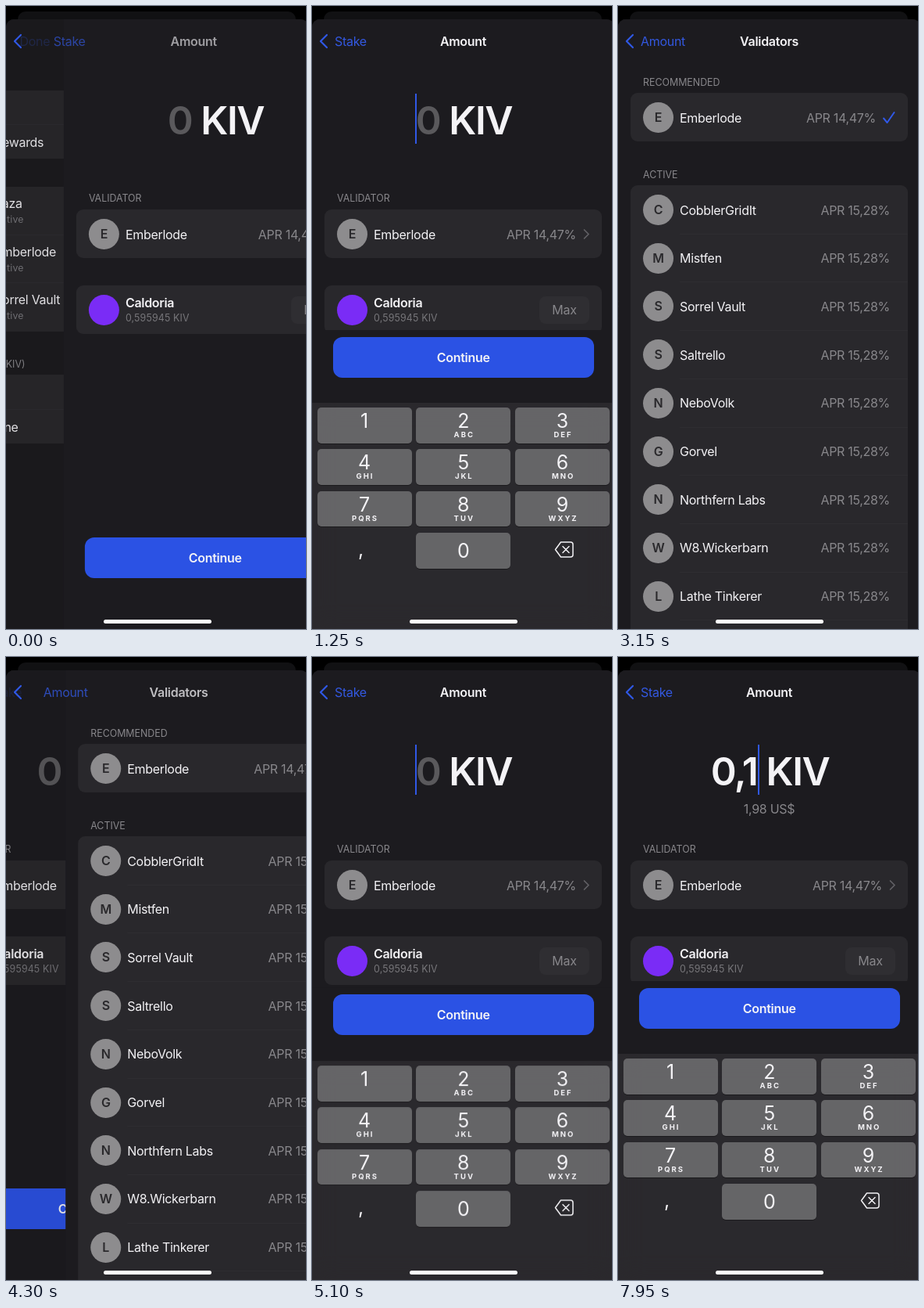
Recreate the animation shown at these times as an HTML page. Size 384x796 px, loop 8 s.

```html
<!DOCTYPE html>
<html lang="en">
<head>
<meta charset="utf-8">
<title>Stake amount</title>
<style>
html, body { margin: 0; width: 100%; height: 100%; overflow: hidden; background: #000; }
body { font: 16px/20px Inter, Roboto, sans-serif; letter-spacing: -.3px; color: #f4f3f6; }
#stage { position: relative; width: 384px; height: 796px; overflow: hidden; }
#stage div, svg { position: absolute; }
svg { fill: none; overflow: visible; stroke-linecap: round; stroke-linejoin: round; }
.behind { left: 15px; top: 7px; width: 356px; height: 30px; border-radius: 10px; background: #111113; }
.sheet { left: 0; top: 17px; width: 387px; height: 779px; border-radius: 10px 10px 0 0; overflow: hidden; background: #1c1b1f; }
.page, #nav { left: 0; top: -17px; width: 387px; height: 796px; }
.page { background: #1c1b1f; }
.t { white-space: pre; }
.b { font-weight: 600; }
.g { color: #88878b; }
.small { font-size: 12.4px; letter-spacing: 0; }
.sub { font-size: 12.4px; letter-spacing: .15px; color: #77767a; }
.blue { color: #3358e0; }
.card { left: 16px; width: 355px; border-radius: 9px; background: #29282c; }
.line { left: 79px; width: 292px; height: 1px; background: #2e2d31; }
.dot { left: 32px; width: 39px; height: 39px; border-radius: 50%; background: #8d8c8e; color: #2a292c;
  text-align: center; line-height: 39px; font-weight: 600; }
.mid { left: 0; width: 387px; text-align: center; white-space: pre; }
.big { font-size: 50px; font-weight: 600; letter-spacing: -1.5px; line-height: 60px; top: 115.5px; left: 1px; }
.caret { display: inline-block; width: 0; position: relative; }
.caret::before { content: ""; position: absolute; left: -1px; top: -52px; width: 2px; height: 64px; background: #3058e6; }
#after::before { left: 1px; }
.max { left: 291px; top: 371px; width: 64px; height: 35px; border-radius: 8px; background: #2f2e32; text-align: center; line-height: 35px; }
#bar { left: 0; top: 670px; width: 387px; height: 400px; background: #1c1b1f; }
.go { left: 26.5px; top: 8.5px; width: 334.5px; height: 52px; border-radius: 12px; background: #2b52e4; text-align: center; line-height: 52px; }
#keys { left: 0; top: 507px; width: 387px; height: 289px; background: rgba(48,47,50,.74); backdrop-filter: blur(16px); }
.key { width: 121px; height: 45.5px; border-radius: 5px; background: rgba(255,255,255,.28); box-shadow: 0 1px rgba(0,0,0,.35);
  text-align: center; font-size: 25px; letter-spacing: 0; }
.key div { left: 0; width: 100%; }
.key .abc { top: 25px; font-size: 9.5px; font-weight: 700; letter-spacing: 2px; text-indent: 2px; }
.home { left: 125px; top: 783.5px; width: 138px; height: 5px; border-radius: 3px; background: #fff; }
</style>
</head>
<body>
<div id="stage"></div>
<script>
const COIN = "KIV", MAIN = "Emberlode", SORREL = "Sorrel Vault";
const LIST = ["CobblerGridIt", "Mistfen", SORREL, "Saltrello", "NeboVolk", "Gorvel",
  "Northfern Labs", "W8.Wickerbarn", "Lathe Tinkerer", "Quillmere"];

// y is the middle of the capitals
const text = (x, y, s, cls = "") => `<div class="t ${cls}" style="left:${x}px;top:${y - 10}px">${s}</div>`;
const right = (x, y, s) => `<div class="t g" style="right:${387 - x}px;top:${y - 10}px">${s}</div>`;
const card = (top, bottom) => `<div class="card" style="top:${top}px;height:${bottom - top}px"></div>`;
const line = y => `<div class="line" style="top:${y}px"></div>`;
const dot = (y, s, style = "") => `<div class="dot" style="top:${y - 19.5}px;${style}">${s}</div>`;
const path = (d, color, w) => `<svg width="1" height="1" style="left:0;top:0"><path d="${d}" stroke="${color}" stroke-width="${w}"/></svg>`;
const row = (y, name, apr, edge) => dot(y, name[0]) + text(79, y, name) + right(edge, y, "APR " + apr);

const stakePage = card(108, 195) + line(151) + text(79, 174, "Rewards") +
  card(231, 416) + ["Iraza", MAIN, SORREL].map((n, i) =>
    text(79, 252 + i * 61.7, n) + text(79, 273 + i * 61.7, "Active", "sub") + (i ? line(230 + i * 61.7) : "")).join("") +
  text(32, 457.5, `STAKING (${COIN})`, "g small") + card(471, 559) + line(515) + text(79, 538, "Line");

const amountPage = `<div class="mid big"><i class="caret" id="before"></i><span id="num">0</span><i class="caret" id="after"></i> ${COIN}</div>
  <div class="mid g" id="usd" style="top:184px"></div>` +
  text(32, 246, "VALIDATOR", "g small") + card(260, 322) + row(291.5, MAIN, "14,47%", 338) +
  path("M348.5 286l5.5 5.5-5.5 5.5", "#626165", 1.7) +
  card(357, 419) + dot(388, "", "background:#7a2cf6") + text(79, 378.5, "Caldoria", "b") +
  text(79, 399, "0,595945 " + COIN, "sub") + `<div class="max g">Max</div>
  <div id="bar"><div class="go b">Continue</div></div>`;

const listPage = text(32, 97.5, "RECOMMENDED", "g small") + card(111, 173) + row(142.5, MAIN, "14,47%", 330) +
  path("M340 143.5l4.5 5.5 9-13", "#3058e6", 2) +
  text(32, 215.5, "ACTIVE", "g small") + card(229, 860) +
  LIST.map((n, i) => row(260.5 + i * 61.7, n, "15,28%", 348) + (i ? line(229 + i * 61.7) : "")).join("");

const titles = ["Stake", "Amount", "Validators"], backs = ["Done", "Stake", "Amount"];
const nav = titles.map((s, i) => `<div class="mid b title" style="top:35px">${s}</div>` +
  `<div class="t blue back" style="left:${i ? 29 : 62}px;top:35px">${backs[i]}</div>`).join("") +
  path("M19 37l-8 8 8 8", "#3058e6", 2.2);

const key = (n, col, r, abc) => `<div class="key" id="k${n}" style="left:${6.5 + col * 126.8}px;top:${6 + r * 53.4}px">` +
  `<div style="top:${n ? 7 : 13}px">${n}</div><div class="abc">${abc}</div></div>`;
const keys = ["", "ABC", "DEF", "GHI", "JKL", "MNO", "PQRS", "TUV", "WXYZ"]
  .map((abc, i) => key(i + 1, i % 3, Math.floor(i / 3), abc)).join("") + key(0, 1, 3, "") +
  `<div style="left:59px;top:177px;font-size:25px">,</div>` +
  path("M318.5 178h12.5a3 3 0 0 1 3 3v13a3 3 0 0 1-3 3h-12.5l-7-9.5zM321 183.5l8 8m0-8l-8 8", "#f4f3f6", 1.5);

const $ = id => document.getElementById(id);
$("stage").innerHTML = `<div class="behind"></div><div class="sheet">` +
  [stakePage, amountPage, listPage].map(p => `<div class="page">${p}</div>`).join("") +
  `<div id="nav">${nav}</div></div><div id="keys">${keys}</div><div class="home"></div>`;
const all = cls => [...document.querySelectorAll(cls)];
const pages = all(".page"), titleEls = all(".title"), backEls = all(".back");

const clamp = v => Math.max(0, Math.min(1, v));
const spring = t => t < 0 ? 0 : 1 - (1 + t * .016) * Math.exp(-t * .016);
const position = t => spring(t + 190) + spring(t - 2420) - spring(t - 4250);
const HIDE = 2412, SHOW = 4770, ZERO = 5850, COMMA = 6650, ONE = 7400;

function put(el, x, y, opacity = 1) {
  el.style.transform = `translate(${x}px,${y}px)`;
  el.style.opacity = opacity;
}

function caretAlpha(t) {
  if (t < 330 || t >= HIDE && t < SHOW) return 0;
  if (t >= ZERO) return 1;
  const phase = (t + 550 - (t >= SHOW ? 120 : 0)) % 900;
  return phase < 650 ? clamp((500 - phase) / 200) : (phase - 650) / 250;
}

function draw(t) {
  const p = position(t), q = position(t - 12);
  pages.forEach((el, i) => {
    const d = p - i;
    put(el, d < 0 ? Math.min(1, -d) * 387 : -116 * d, 0);
    el.style.filter = d > .002 ? `brightness(${1 - .1 * Math.min(1, d)})` : "none";
  });
  titleEls.forEach((el, i) => {
    const d = q - i;
    put(el, d < 0 ? -212 * d : -136 * d, 0, d < 0 ? clamp(1 + d) ** 2 : clamp(1 - 1.3 * d));
    put(backEls[i], d < 0 ? -144 * d : -57 * d, 0, d < 0 ? clamp(1 + d) ** 1.5 : clamp(1 - d));
  });

  const up = spring(t - 330) - spring(t - HIDE) + spring(t - SHOW);
  put($("keys"), 0, 289 * (1 - up));
  put($("bar"), 0, t >= HIDE && t < SHOW ? 0 : -256 * up);

  const typed = t >= ZERO;
  $("num").textContent = t >= ONE ? "0,1" : t >= COMMA ? "0," : "0";
  $("num").style.color = typed ? "#f4f3f6" : "#5a595c";
  $("usd").textContent = t >= ONE ? "1,98 US$" : "0,00 US$";
  $("usd").style.opacity = clamp((t - ZERO) / 200);
  $("before").style.opacity = typed ? 0 : caretAlpha(t);
  $("after").style.opacity = typed ? caretAlpha(t) : 0;
  const press = (n, from) => $("k" + n).style.backgroundColor =
    t >= from && t < from + 150 ? "rgba(255,255,255,.14)" : "";
  press(0, ZERO - 50);
  press(1, ONE - 100);
}

const start = performance.now();
function tick() {
  draw((performance.now() - start) % 8000);
  requestAnimationFrame(tick);
}
tick();
</script>
</body>
</html>
```
